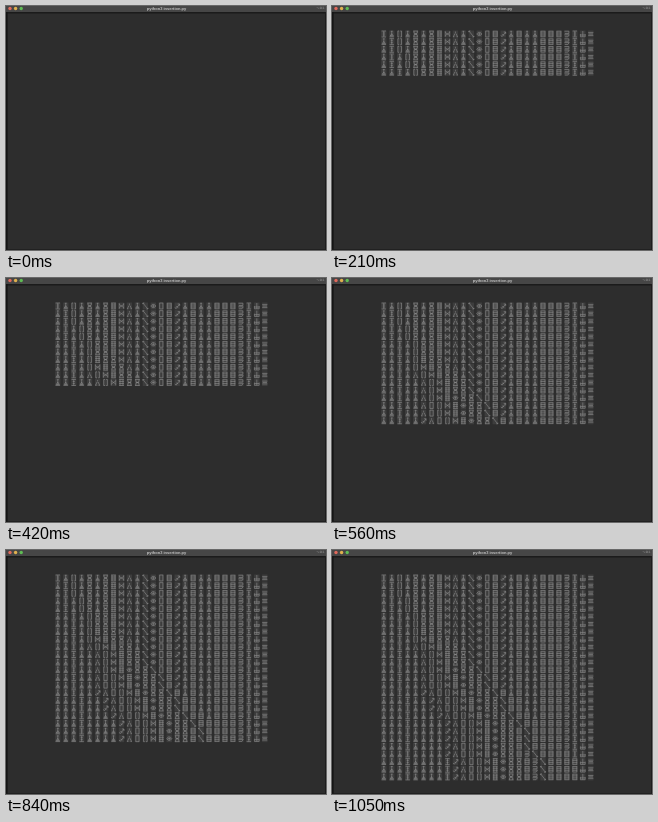
Write an HTML page with a canvas that moves like this. It is 320 by 244 pixels and loops after 1.89 s.

```html
<!DOCTYPE html>
<html lang="en">
<head>
<meta charset="utf-8">
<title>Insertion sort</title>
<style>
html, body { margin: 0; width: 100%; height: 100%; overflow: hidden; background: #2d2d2d; }
canvas { display: block; }
</style>
</head>
<body>
<canvas id="stage" width="320" height="244"></canvas>
<script>
const ctx = document.getElementById('stage').getContext('2d');
const LOOP = 1890, STEP = 70;
const rowsAtStep = [0, 2, 4, 6, 8, 9, 11, 13, 16, 17, 18, 20, 22, 24, 25, 27];

// Small line figures, centred on their cell
const shapes = {
  stem: 'M0-3V2M-1-2.8H1M-2.2 2.9H2.2M-1.6 2L0-.3 1.6 2Z',
  bar: 'M-2.2-3H2.2M0-3V3M-2.2 3H2.2M-1-1H1M-1 1H1',
  brackets: 'M-.6-3H-1.8V3H-.6M.6-3H1.8V3H.6',
  eight: 'M-2.4-3H2.4M-2.4 3H2.4M-1.6-3V-1L1.6 1V3M1.6-3V-1L-1.6 1V3M-1.6 0H1.6',
  grid: 'M-2.4-3H2.4M-2.4 3H2.4M-1.5-3V3M1.5-3V3M-2.4-1H2.4M-2.4 1H2.4',
  cross: 'M-2.3-3V3M2.3-3V3M-2.3-1.6L2.3 1.6M2.3-1.6L-2.3 1.6',
  peak: 'M0-2.5V-1M-.5-.5L-2 2.6M.5-.5L2 2.6M-2.5 2.8H-1M1 2.8H2.5',
  slash: 'M-2.4-3L2.4 3M-2.6-1.8V-3H-1M1 3H2.6V1.8',
  eye: 'M-2.6 0L-1-1.6H1L2.6 0 1 1.6H-1ZM-1.6 0H1.6M0-1V1',
  rails: 'M-1.6-3.2V3.2M1.6-3.2V3.2M-1.6-3H1.6M-1.6 3H1.6',
  lines: 'M-2.4-2.8H2.4M-2.4-1H2.4M-2.4 1H2.4M-2.4 2.8H2.4M-2-2.8V2.8M2-2.8V2.8',
  arrow: 'M-2.5 1.5L-1 2.5 2.5-2M.5-2H2.5V0M-1 .5L1 1.2',
  steps: 'M-2.4-2.8H2V-.5H-2M-2.4.8H2.4L1 2.8H-2',
  comb: 'M-2.4 2.8H2.4V0M-2.4 2.8V0M0 2.8V-3M-2.4 1H2.4',
  pair: 'M-2.6-1.4H2.6M-2.6 1.4H2.6M-2.2 0H2.2'
};
const paths = {};
for (const name in shapes) paths[name] = new Path2D(shapes[name]);

const items = ('bar stem brackets stem eight stem eight grid cross peak stem slash eye rails ' +
  'lines arrow stem lines stem stem lines lines lines steps bar comb pair').split(' ');
const order = [1, 16, 5, 0, 18, 3, 10, 19, 24, 15, 9, 13, 2, 8, 7, 12, 4, 6, 20, 23,
  11, 14, 17, 21, 22, 25, 26];

// Row k is the list after item k has been inserted
const list = items.map((_, i) => i);
const rows = items.map((_, k) => {
  for (let i = k; i > 0 && order.indexOf(list[i]) < order.indexOf(list[i - 1]); i--)
    [list[i], list[i - 1]] = [list[i - 1], list[i]];
  return list.slice();
});

function rect(color, x, y, w, h) {
  ctx.fillStyle = color;
  ctx.fillRect(x, y, w, h);
}

function label(text, x, font, color) {
  ctx.font = font;
  ctx.fillStyle = color;
  ctx.fillText(text, x, 2.6);
}

function drawWindow() {
  rect('#2d2d2d', 0, 0, 320, 244);
  rect('#464646', 0, 0, 320, 6);
  rect('#1b1b1b', 0, 6, 320, 1.5);
  rect('#141414', 0, 6, 1.6, 238);
  rect('#1c1c1c', 319, 6, 1, 238);
  rect('#1c1c1c', 0, 243.3, 320, 0.7);
  ['#e0695c', '#dfb04e', '#5fbc54'].forEach((color, i) => {
    ctx.fillStyle = color;
    ctx.beginPath();
    ctx.arc(4 + i * 5.6, 2.5, 1.7, 0, 7);
    ctx.fill();
  });
  ctx.textAlign = 'center';
  ctx.textBaseline = 'middle';
  label('python3 insertion.py', 160.5, 'bold 4px "Liberation Sans", Arial, sans-serif', '#c4c4c4');
  label('⌥⌘1', 314.5, '3px "DejaVu Sans", sans-serif', '#999');
}

function drawRow(row, r) {
  row.forEach((item, c) => {
    ctx.save();
    ctx.translate(51.8 + c * 7.96, 28 + r * 7.65);
    rect('#3d3d3d', -2.7, -3.5, 5.4, 7);
    ctx.stroke(paths[items[item]]);
    ctx.restore();
  });
}

function frame() {
  const step = Math.floor(performance.now() % LOOP / STEP);
  const count = rowsAtStep[Math.min(step, rowsAtStep.length - 1)];
  drawWindow();
  ctx.strokeStyle = '#8e8e8e';
  ctx.lineWidth = 0.6;
  rows.slice(0, count).forEach(drawRow);
  requestAnimationFrame(frame);
}
frame();
</script>
</body>
</html>
```
